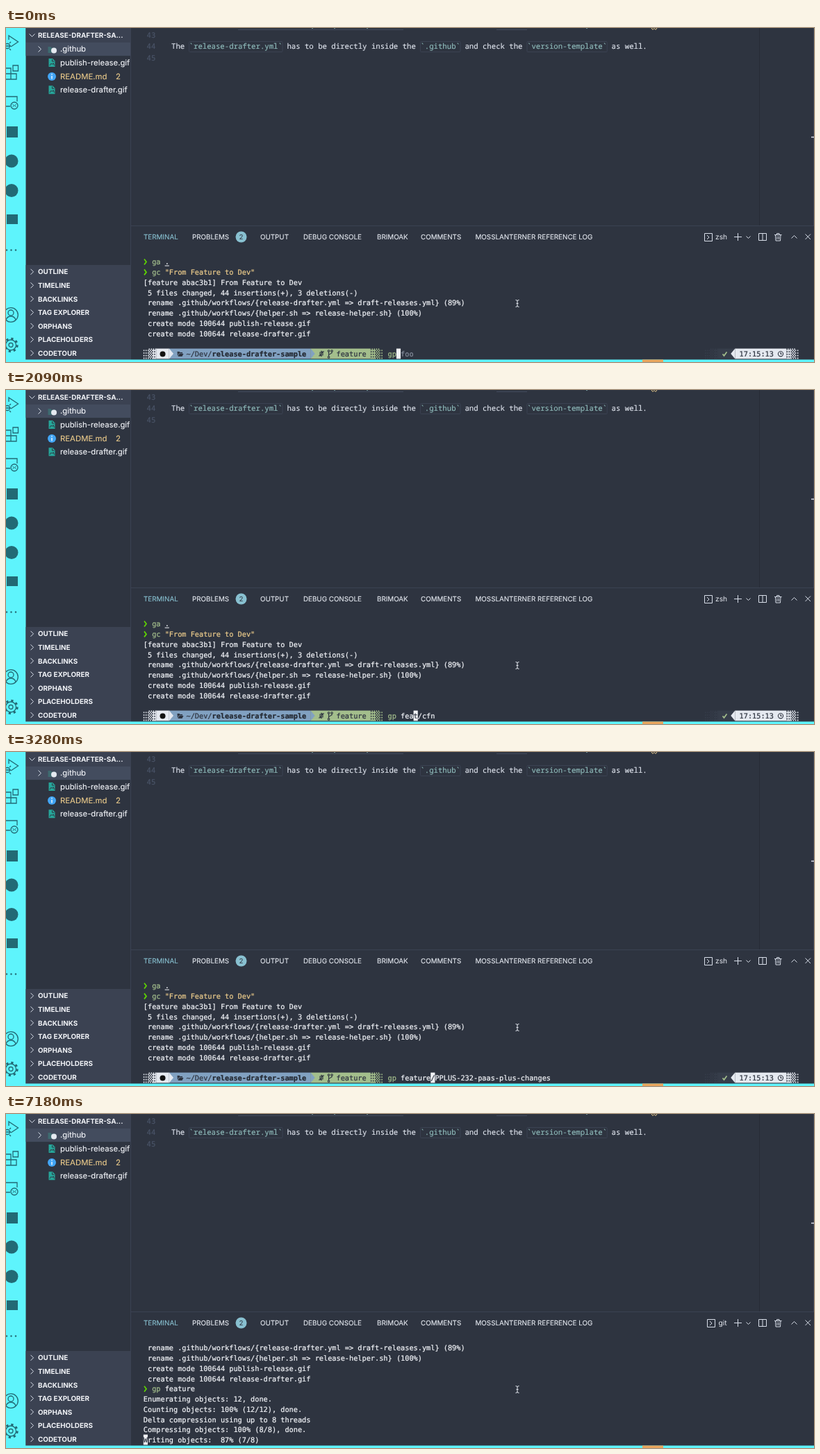
Recreate the animation shown at these times as an HTML page. Size 1163x482 px, loop 8 s.

```html
<!DOCTYPE html>
<html lang="en">
<head>
<meta charset="utf-8">
<title>Terminal push</title>
<style>
html, body { margin: 0; width: 100%; height: 100%; overflow: hidden; background: #2e3440; }
svg { display: block; width: 100%; height: 100%; }
text { white-space: pre; text-rendering: geometricPrecision; font-variant-ligatures: none; }
.term { font: 10.25px "DejaVu Sans Mono", monospace; stroke-width: .22; }
.edit { font: 10.67px "Noto Sans Mono", monospace; stroke-width: .15; }
.file { font: 11.35px Inter, sans-serif; stroke-width: .12; }
.tab { font: 9.8px Inter, sans-serif; stroke-width: .12; }
.head { font: bold 9.9px Inter, sans-serif; stroke-width: 0; }
.bold { font-weight: bold; }
.ui { fill: none; stroke: #d8dee9; stroke-width: 1; }
.act { fill: none; stroke: #226a75; stroke-width: 1.3; }
</style>
</head>
<body>
<svg id="stage" viewBox="0 0 1163 482" preserveAspectRatio="none">
  <rect width="1163" height="482" fill="#2e3440"/>

  <!-- activity bar -->
  <rect width="28.5" height="482" fill="#5ef4fc"/>
  <g class="act">
    <path d="M4 17V11L17.500 20L7 27"/>
    <circle cx="2" cy="26" r="3.500"/><path d="M-1 26H7M5 22L7 20M5 30L7 32"/>
    <path d="M0 58H7V74H0M0 66H15V74H0M10 54H17.500V62H10Z"/>
    <path d="M0 99H16V106M0 113H6"/>
    <circle cx="12" cy="112" r="5"/><path d="M9.500 110L11.500 112L9.500 114M14.500 110L12.500 112L14.500 114" stroke-width="1"/>
    <circle cx="7" cy="414" r="10.300"/><circle cx="7" cy="411" r="4"/><path d="M0 421Q2 416 7 416Q12 416 14 421"/>
    <circle cx="7" cy="457.500" r="7.500"/><circle cx="7" cy="457.500" r="3"/>
    <circle cx="7" cy="457.500" r="9.200" stroke-width="3" stroke-dasharray="3.200 4.025"/>
  </g>
  <g fill="#226a75">
    <rect x="1" y="142" width="16" height="16"/>
    <circle cx="8" cy="192" r="9.500"/>
    <circle cx="8" cy="234.500" r="9.500"/>
    <rect x="1" y="269" width="16" height="14"/>
    <circle cx="1" cy="320.500" r="1.200"/><circle cx="7.500" cy="320.500" r="1.200"/><circle cx="14" cy="320.500" r="1.200"/>
  </g>

  <!-- sidebar -->
  <rect x="28.500" width="151" height="20.500" fill="#3b4252"/>
  <rect x="28.500" y="20.500" width="151" height="19.600" fill="#434c5e"/>
  <rect x="28.500" y="342" width="151" height="137" fill="#3b4252"/>
  <path d="M179.500 0V479" stroke="#3b4252"/>
  <path d="M60.500 27h4l1 1.500h6V36h-11Z" fill="#3e6a70"/>
  <circle cx="69" cy="32.500" r="4" fill="#e5e9f0"/>
  <circle cx="66" cy="70" r="6" fill="#42a5f5"/>
  <path d="M66 69V73.500M66 66V67.500" stroke="#fff" stroke-width="1.300"/>
  <g id="side"></g>

  <!-- editor -->
  <path d="M334 2.500H572M706 2.500H750" stroke="#434c5e"/>
  <path d="M440 .5h2M472 .5h2M519 .5h2M835 .5h2" stroke="#6d8f94"/>
  <path d="M929 0l2 2.500l2-2l2 2l2-2.500" fill="none" stroke="#ebcb8b"/>
  <path d="M1084.500 0V285" stroke="#272c36"/>
  <path d="M1162.500 0V285" stroke="#3b4252"/>
  <path d="M1159 157.500H1163" stroke="#d8dee9" stroke-width="1.500"/>
  <g id="editor"></g>

  <!-- panel -->
  <path d="M180 285.500H1163" stroke="#3b4252"/>
  <g id="tabs"></g>
  <circle cx="338.500" cy="301.500" r="8" fill="#88c0d0"/>
  <text class="tab" x="335.500" y="305" fill="#2e3440">2</text>
  <g class="ui">
    <path d="M1053.500 296V307M1048 301.500H1059M1065.500 300.500L1068.500 303.500L1071.500 300.500"/>
    <path d="M1083.500 296.500H1094.500V306.500H1083.500ZM1089 296.500V306.500"/>
    <path d="M1106 298.500H1116.500M1109.500 298V296.500H1113V298M1107.500 298.500L1108 307H1114.500L1115 298.500M1110 300.500V305M1112.500 300.500V305"/>
    <path d="M1130.500 303.500L1134.500 299.500L1138.500 303.500M1150.500 297.500L1158 305M1158 297.500L1150.500 305"/>
    <g id="shellIcon"><path d="M1005.500 296.500H1016.500V307.500H1005.500ZM1009 299L1012 302L1009 305"/></g>
  </g>
  <text id="shell" class="tab" style="font-size:10.2px" y="305" fill="#e5e9f0"></text>

  <g id="term"></g>
  <path d="M733.500 392.500Q736 392.500 736 394Q736 392.500 738.500 392.500M736 394V401M733.500 402.500Q736 402.500 736 401Q736 402.500 738.500 402.500M734.500 397.500H737.500" fill="none" stroke="#e5e9f0"/>
  <rect y="478.500" width="1163" height="3.500" fill="#5ef4fc"/>
  <rect x="916" y="478.500" width="30" height="3.500" fill="#e8a45c"/>
</svg>
<script>
const $ = id => document.getElementById(id);
const WHITE = '#f2f4f8', DARK = '#2e3440', GREEN = '#a3be8c', GHOST = '#858d9c',
      BLUE = '#81a1c1', YELLOW = '#ebcb8b', ARROW = '#5fd700', TEAL = '#8fbcbb';
const CW = 6.171, RH = 14.78, X0 = 197.8, Y0 = 329.6;

function add(parent, tag, attrs, str) {
  const e = document.createElementNS('http://www.w3.org/2000/svg', tag);
  for (const k in attrs) e.setAttribute(k, attrs[k]);
  if (str !== undefined) e.textContent = str;
  return parent.appendChild(e);
}
const label = (g, cls, x, y, str, fill) =>
  add(g, 'text', { class: cls, x, y, fill, stroke: fill }, str);
const colX = c => X0 + c * CW;
const rowY = r => Y0 + r * RH;

// static parts
const chevron = (x, y, open) => add($('side'), 'path', {
  class: 'ui', d: open ? `M${x - 4} ${y - 2}l4 4l4-4` : `M${x - 2} ${y - 4}l4 4l-4 4` });

function buildSide() {
  const g = $('side');
  chevron(37.5, 10.5, true);
  label(g, 'head', 46, 14, 'RELEASE-DRAFTER-SA...', WHITE);
  chevron(48.5, 30.5);
  [['.github', WHITE], ['publish-release.gif', WHITE], ['README.md', YELLOW], ['release-drafter.gif', WHITE]]
    .forEach(([name, fill], i) => {
      const y = 30.5 + i * 19.6;
      label(g, 'file', 78, y + 3.9, name, fill);
      if (!name.endsWith('gif')) return;
      add(g, 'path', { d: `M61.500 ${y - 6}h5.500l3.500 3.500v8.500h-9Z`, fill: '#26a69a' });
      add(g, 'path', { d: `M63 ${y + 4}l2-3l1.500 1.500l1.500-2l1.500 3.500M66.500 ${y - 5}v3h3`, fill: 'none', stroke: DARK });
    });
  label(g, 'file', 158, 73.7, '2', YELLOW);
  ['OUTLINE', 'TIMELINE', 'BACKLINKS', 'TAG EXPLORER', 'ORPHANS', 'PLACEHOLDERS', 'CODETOUR']
    .forEach((name, i) => {
      const y = 351.8 + i * 19.55;
      chevron(37.5, y);
      label(g, 'head', 46, y + 3.6, name, WHITE);
    });
}

function buildEditor() {
  const g = $('editor'), step = 6.4;
  [43, 44, 45].forEach((n, i) => label(g, 'edit', 202.5, 14.2 + i * 16.2, n, '#4c566a'));
  let col = 0;
  ['The ', '`release-drafter.yml`', ' has to be directly inside the ', '`.github`',
   ' and check the ', '`version-template`', ' as well.'].forEach((s, i) => {
    const x = 238 + col * step;
    if (i % 2) add(g, 'rect', { x, y: 19.5, width: s.length * step, height: 15, rx: 1, fill: 'none', stroke: '#3b4252' });
    label(g, 'edit', x, 30.3, s, i % 2 ? TEAL : '#dfe4ed');
    col += s.length;
  });
}

function buildTabs() {
  [[198, 'TERMINAL'], [268, 'PROBLEMS'], [366, 'OUTPUT'], [428, 'DEBUG CONSOLE'], [534, 'BRIMOAK'],
   [597, 'COMMENTS'], [675.5, 'MOSSLANTERNER REFERENCE LOG']]
    .forEach(([x, s], i) => label($('tabs'), 'tab', x, 305.1, s, i ? '#e5e9f0' : '#88c0d0'));
}

// terminal
const G = $('term');

// runs: [text, colour, extra class]
function write(col, row, ...runs) {
  for (const [s, fill = WHITE, extra = ''] of runs) {
    label(G, 'term ' + extra, colX(col), rowY(row) + 11.6, s, fill);
    col += s.length;
  }
}
const cells = (c, n, row, fill) =>
  add(G, 'rect', { x: colX(c), y: rowY(row), width: n * CW, height: RH, fill });

function caret(col, row, ch = '') {
  cells(col, 1, row, WHITE);
  write(col, row, [ch, DARK]);
}

function arrowMark(row) {
  const y = rowY(row) + 4;
  add(G, 'path', { d: `M199 ${y}l3 4l-3 4`, fill: 'none', stroke: ARROW, 'stroke-width': 1.7 });
}

// dotted shade cell, level 1 (light) to 3 (dense)
function shade(col, row, level, fill) {
  const w = CW / 4, h = RH / 8;
  let d = '';
  for (let r = 0; r < 8; r++) for (let c = 0; c < 4; c++) {
    const odd = (r + c) % 2;
    const on = level === 1 ? odd && r % 2 : level === 2 ? odd : odd || r % 2;
    if (on) d += `M${colX(col) + c * w} ${rowY(row) + r * h}h${w}v${h}h${-w}z`;
  }
  add(G, 'path', { d, fill });
}

function tip(col, row, fill, left) {
  const x = colX(left ? col + 1 : col), y = rowY(row);
  add(G, 'path', { d: `M${x} ${y}l${left ? -CW : CW} ${RH / 2}L${x} ${y + RH}Z`, fill });
}

function promptBar(row) {
  const y = rowY(row) + RH / 2;
  const line = { fill: 'none', stroke: DARK, 'stroke-width': 1.1 };
  [1, 2, 3].forEach(l => {
    shade(l - 1, row, l, '#e5e9f0');
    shade(56 - l, row, l, GREEN);
    shade(130 + l, row, l, '#363d4a');
    shade(153 - l, row, l, '#e5e9f0');
  });
  cells(3, 3, row, '#e5e9f0');
  add(G, 'circle', { cx: 225.5, cy: y + .5, r: 4, fill: '#111' });
  cells(6, 33, row, BLUE);
  tip(6, row, '#e5e9f0');
  add(G, 'path', { d: `M246.500 ${y - 3}h3l1 1h3.500v1.500h-5l-2 4ZM249.500 ${y}h6l-2 4h-6Z`, fill: DARK });
  write(10, row, ['~/Dev/', DARK], ['release-drafter-sample', '#232831', 'bold']);
  cells(39, 14, row, GREEN);
  tip(39, row, BLUE);
  add(G, 'path', { ...line, d: `M450 ${y + 3}h2v-5h3M458 ${y - 3}h-2v5h-3M453.500 ${y - 4}l2 2l-2 2M454.500 ${y}l-2 2l2 2` });
  add(G, 'path', { ...line, d: `M464.500 ${y - 3}v7M469 ${y - 3}v2l-4.500 2.500` });
  for (const [cx, dy] of [[464.5, -4], [464.5, 5], [469, -4]]) add(G, 'circle', { ...line, cx, cy: y + dy, r: 1.3 });
  write(45, row, ['feature', DARK]);

  cells(134, 4, row, '#363d4a');
  add(G, 'path', { d: `M1031.500 ${y + .5}l2 2.500l4-5.500`, fill: 'none', stroke: GREEN, 'stroke-width': 1.7 });
  tip(137, row, '#e5e9f0', true);
  cells(138, 12, row, '#e5e9f0');
  write(139, row, ['17:15:13', DARK]);
  add(G, 'circle', { ...line, cx: 1115, cy: y + .3, r: 3.6 });
  add(G, 'path', { ...line, d: `M1115 ${y - 2}v2.500h2` });
}

const LOG = [
  '> ga .', '> gc "From Feature to Dev"',
  '[feature abac3b1] From Feature to Dev',
  ' 5 files changed, 44 insertions(+), 3 deletions(-)',
  ' rename .github/workflows/{release-drafter.yml => draft-releases.yml} (89%)',
  ' rename .github/workflows/{helper.sh => release-helper.sh} (100%)',
  ' create mode 100644 publish-release.gif',
  ' create mode 100644 release-drafter.gif',
  '> gp feature',
  'Enumerating objects: 12, done.',
  'Counting objects: 100% (12/12), done.',
  'Delta compression using up to 8 threads',
  'Compressing objects: 100% (8/8), done.'
];

function showLog(from, to) {
  LOG.slice(from, to).forEach((s, row) => {
    if (s[0] !== '>') return write(0, row, [s]);
    arrowMark(row);
    const arg = s.slice(5);
    write(2, row, [s.slice(2, 4), GREEN]);
    write(5, row, [arg, arg[0] === '"' ? YELLOW : WHITE]);
    if (arg === '.') add(G, 'rect', { x: colX(5), y: rowY(row) + 13, width: CW, height: 1, fill: WHITE });
  });
}

// typed part, suggested rest, colour of the rest, colour of the typed argument
function typing(typed, rest, fill, argFill = WHITE) {
  showLog(0, 8);
  promptBar(9);
  const at = 57 + typed.length;
  write(57, 9, [typed.slice(0, 2), GREEN], [typed.slice(2), argFill]);
  caret(at, 9, rest[0]);
  write(at + 1, 9, [rest.slice(1), fill]);
}

function pushing(done) {
  showLog(4, 13);
  write(1, 9, [`riting objects:  ${Math.floor(done / 8 * 100)}% (${done}/8)`]);
  caret(0, 9, 'W');
}

const BRANCH = '/PPLUS-232-paas-plus-changes';
const STEPS = [
  [0, () => typing('gp', ' foo', GHOST)],
  [1050, () => typing('gp ', 'foo', WHITE)],
  [1200, () => typing('gp f', 'oo', GHOST, GHOST)],
  [1650, () => typing('gp f', 'oo', WHITE)],
  [1940, () => typing('gp fe', 'at/cfn', GHOST)],
  [2090, () => typing('gp fea', 't/cfn', WHITE)],
  [2840, () => typing('gp feat', '/cfn', WHITE)],
  [3130, () => typing('gp featu', 're' + BRANCH, GHOST)],
  [3280, () => typing('gp feature', BRANCH, WHITE)],
  [4480, () => { showLog(0, 9); caret(0, 9); }],
  [7030, () => pushing(6)],
  [7180, () => pushing(7)]
];
const LOOP = 8000, RUN = 4480;
let shown = -1;

function render(t) {
  const i = STEPS.findLastIndex(s => s[0] <= t);
  if (i === shown) return;
  shown = i;
  G.replaceChildren();
  STEPS[i][1]();
  const git = STEPS[i][0] >= RUN;
  $('shell').textContent = git ? 'git' : 'zsh';
  $('shell').setAttribute('x', git ? 1025.5 : 1021);
  $('shellIcon').setAttribute('transform', `translate(${git ? 4 : 0} 0)`);
}

buildSide();
buildEditor();
buildTabs();
const start = performance.now();
function tick() {
  render((performance.now() - start) % LOOP);
  requestAnimationFrame(tick);
}
tick();
</script>
</body>
</html>
```
